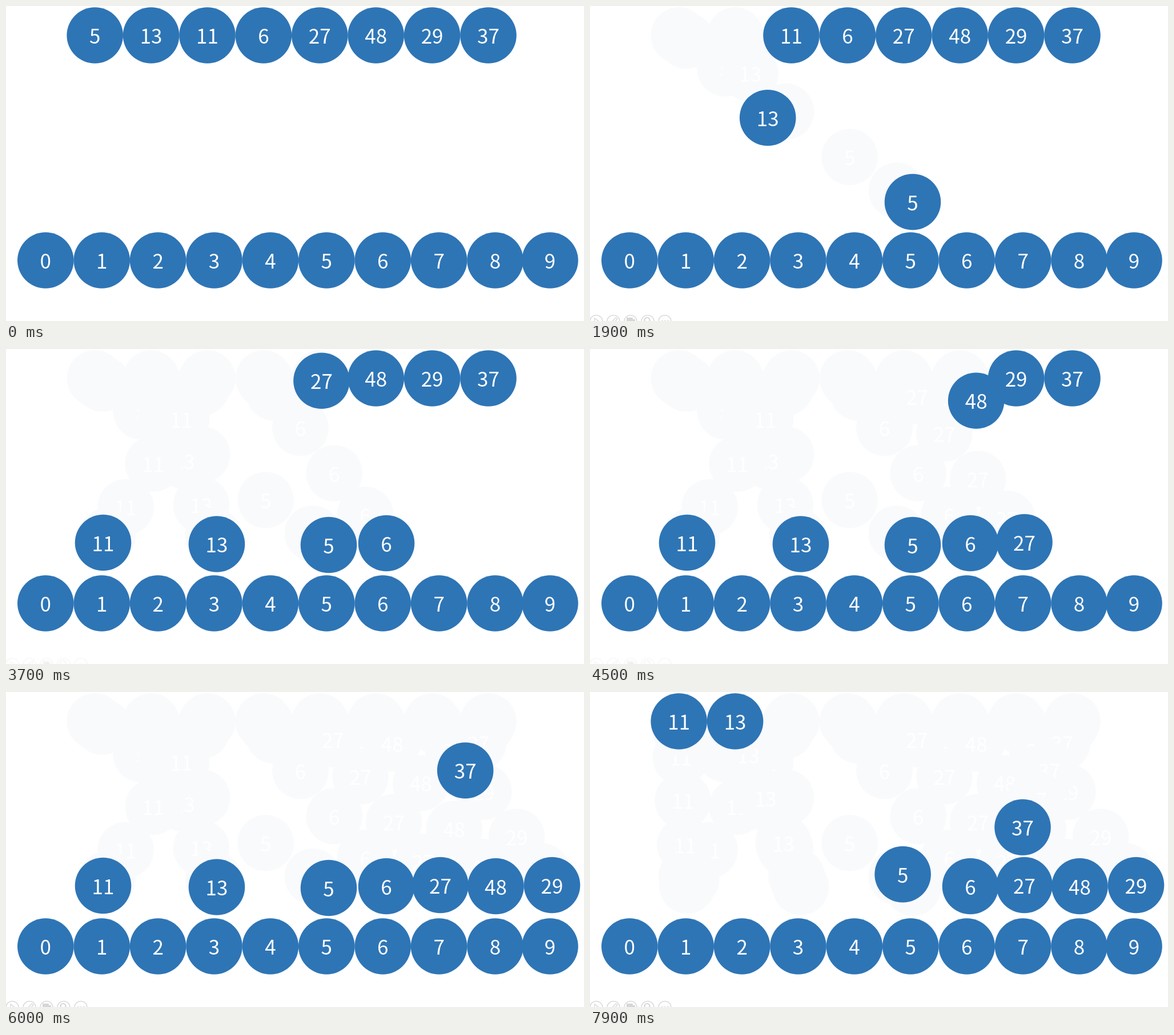
An HTML page with a canvas that plays this animation: 1012 by 553 pixels, repeating every 8000 ms.

```html
<!DOCTYPE html>
<html lang="en">
<head>
<meta charset="utf-8">
<title>Radix sort</title>
<style>
html, body { margin: 0; width: 100%; height: 100%; overflow: hidden; background: #fff; }
canvas { display: block; }
</style>
</head>
<body>
<canvas id="stage" width="1012" height="553"></canvas>
<script>
const ctx = document.getElementById('stage').getContext('2d');
const LOOP = 8000, STEP = 100, DURATION = 558, RADIUS = 49.3;
const BLUE = '#2e75b6', PALE = '#f9fafc';

const slot = i => [155.7 + 98.4 * i, 51.5];
const values = [5, 13, 11, 6, 27, 48, 29, 37];
const rests = [[565, 344], [369, 342.5], [170, 340], [666, 341],
               [760.5, 339], [857.5, 341], [956, 339], [757.5, 237.5]];

// Into the buckets one by one, then back to the row in bucket order.
const starts = [936, 1622, 2314, 2994, 3680, 4366, 5046, 5734, 6415, 7108, 7797];
const collected = [2, 1, 0];
const moves = starts.map((start, i) => {
  const back = i >= values.length;
  const ball = back ? collected[i - values.length] : i;
  return {
    start, ball,
    from: back ? rests[ball] : slot(ball),
    to: back ? slot(i - values.length) : rests[ball]
  };
});

function progress(move, time) {
  const x = Math.min(1, (time - move.start) / DURATION);
  return Math.max(.015, (1 - Math.cos(Math.PI * x)) / 2);
}

function place(move, time) {
  const p = progress(move, time);
  return move.from.map((v, i) => v + (move.to[i] - v) * p);
}

function drawBall([x, y], label, color) {
  ctx.fillStyle = color;
  ctx.beginPath();
  ctx.arc(x, y, RADIUS, 0, 2 * Math.PI);
  ctx.fill();
  ctx.fillStyle = '#fff';
  ctx.fillText(label, x, y + 14.5);
}

// Pale marks left behind at every step of a move.
function drawTrail(move, time) {
  drawBall(move.from, '', PALE);
  const end = Math.min(time, move.start + DURATION);
  for (let t = Math.ceil(move.start / STEP) * STEP; t < end; t += STEP) {
    drawBall(place(move, t), progress(move, t) > .1 ? values[move.ball] : '', PALE);
  }
}

function line(...points) {
  ctx.beginPath();
  points.forEach(([x, y]) => ctx.lineTo(x, y));
  ctx.stroke();
}

function ring(x, y, r) {
  ctx.beginPath();
  ctx.arc(x, y, r, 0, 2 * Math.PI);
  ctx.stroke();
}

function drawControls(time) {
  if (time < 600) return;
  ctx.save();
  ctx.globalAlpha = time >= 2200 && time < 4900 ? .22 : 1;
  ctx.strokeStyle = ctx.fillStyle = '#d6d6d6';
  ctx.lineWidth = 1.3;
  for (let i = 0; i < 5; i++) ring(11 + 30 * i, 554, 11.2);
  line([8, 560], [8, 548], [16, 554]);
  line([35, 558], [45, 547], [48, 549], [38, 560]);
  ctx.fillRect(64, 547, 11, 8);
  ctx.fillRect(68, 550, 11, 8);
  for (let i = 0; i < 3; i++) ctx.fillRect(125 + 5 * i, 552, 2.5, 2.5);
  ctx.lineWidth = 2.2;
  ring(100, 551.5, 4.5);
  ctx.restore();
}

function draw(time) {
  ctx.fillStyle = '#fff';
  ctx.fillRect(0, 0, 1012, 553);
  ctx.font = '300 35px "Noto Sans CJK SC", "Noto Sans CJK JP", "Noto Sans CJK", sans-serif';
  ctx.textAlign = 'center';

  const spots = values.map((_, i) => slot(i));
  for (const move of moves) {
    if (time < move.start) break;
    drawTrail(move, time);
    spots[move.ball] = place(move, time);
  }
  for (let i = 0; i < 10; i++) {
    drawBall([i < 9 ? 69.3 + 98.4 * i : 952.5, 446.5], i, BLUE);
  }
  spots.forEach((spot, i) => drawBall(spot, values[i], BLUE));
  drawControls(time);
}

function frame() {
  draw(Math.floor(performance.now() % LOOP / STEP) * STEP);
  requestAnimationFrame(frame);
}
frame();
</script>
</body>
</html>
```
